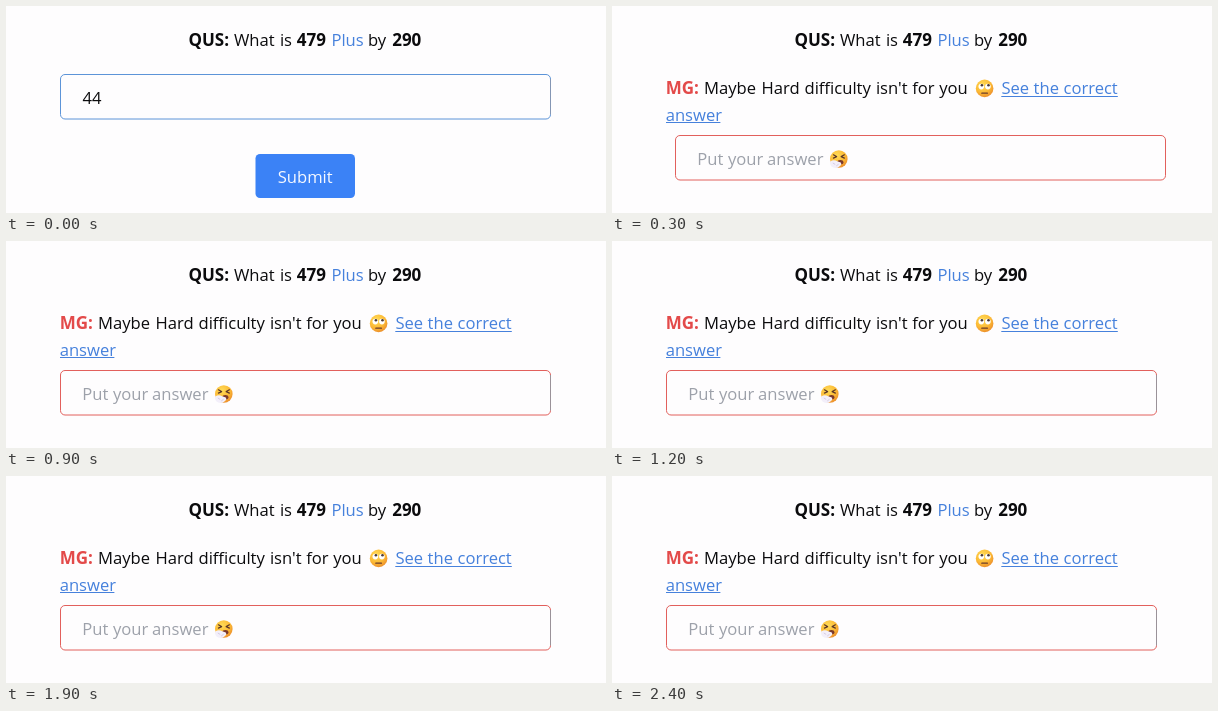
These frames come from a looping animation (600x207 px, 2500 ms). An HTML page:

```html
<!DOCTYPE html>
<html lang="en">
<head>
<meta charset="utf-8">
<title>Quiz question</title>
<style>
  html, body { margin: 0; width: 100%; height: 100%; overflow: hidden; background: #fefdfe; }
  svg { display: block; width: 600px; height: 207px; }
  text { font: 16.6px "Open Sans", "Noto Sans", sans-serif; fill: #0b0b0d; }
  .bold { font-size: 17px; font-weight: 700; }
  .red { fill: #e34a4a; }
  .blue { fill: #4681dc; }
  .hint { fill: #9da1aa; }
  .white { fill: #f5f8ff; }
  .rule { stroke: #4681dc; stroke-width: 1; }
  .box { fill: #fefdfe; }
</style>
</head>
<body>
<svg viewBox="0 0 600 207">
  <defs>
    <radialGradient id="skin" cx=".4" cy=".3" r=".75">
      <stop offset="0" stop-color="#ffdc58"/>
      <stop offset=".6" stop-color="#fcb934"/>
      <stop offset="1" stop-color="#ea8a2c"/>
    </radialGradient>
  </defs>

  <g id="title"></g>

  <g id="ask">
    <rect class="box" x="54.5" y="68.5" width="490" height="44.5" rx="4.5" stroke="#5c94d8"/>
    <path d="M544.5 73V108.5" stroke="#8496b4"/>
    <rect x="249.5" y="148" width="99.5" height="44" rx="4.5" fill="#3b82f6"/>
  </g>

  <g id="wrong">
    <path class="rule" d="M389.3 90.5H505.8M54 116.5H108.4"/>
    <g transform="translate(372.6 82.4)">
      <circle r="8.8" fill="url(#skin)"/>
      <g fill="#fff">
        <circle cx="-3.3" cy="-1.8" r="2.8"/>
        <circle cx="3.3" cy="-1.8" r="2.8"/>
      </g>
      <g fill="#4b3a38">
        <circle cx="-2.7" cy="-3.2" r="1.3"/>
        <circle cx="3.9" cy="-3.2" r="1.3"/>
      </g>
      <path d="M-2.8 4.8H2.8" stroke="#6b3d2a" stroke-width="1.3" stroke-linecap="round"/>
    </g>
    <g id="field">
      <rect class="box" x="54.5" y="129.5" width="490" height="44.5" rx="4.5" stroke="#e2605c"/>
      <path id="edge" d="M544.5 134V169.5" stroke="#9a9299"/>
      <g transform="translate(217.8 153)">
        <circle r="8.8" fill="url(#skin)"/>
        <g fill="none" stroke="#5a3527" stroke-width="1.2" stroke-linecap="round" stroke-linejoin="round">
          <path d="M-5.4 -4.2L-2.2 -2.4L-5.4 -.9"/>
          <path d="M5.6 -4.2L2.4 -2.4L5.6 -.9"/>
        </g>
        <ellipse cx="1.6" cy="3.2" rx="3" ry="2.2" fill="#7c3a2b"/>
        <path d="M-8.6 2.4Q-5 .2 -1.6 2.2L2 3.6Q3.4 6 .6 7.4Q-2 9.6 -5.6 8.6Q-9.6 6.4 -8.6 2.4Z" fill="#f3effa"/>
        <path d="M-6 4L-3.6 5.4M-2.6 7L-.2 5.2" stroke="#cfc3dd" stroke-width=".8"/>
      </g>
    </g>
  </g>
</svg>
<script>
  const LOOP = 2500, STEP = 100;
  // Horizontal offset of the answer field for each step after the submit.
  const SHAKE = [1.5, -3, 9, -2, 0];
  const $ = id => document.getElementById(id);

  // Places [word, x] pairs on one baseline.
  function write(group, y, style, ...words) {
    for (const [word, x] of words) {
      const el = document.createElementNS("http://www.w3.org/2000/svg", "text");
      el.setAttribute("x", x);
      el.setAttribute("y", y);
      el.setAttribute("class", style);
      el.textContent = word;
      $(group).append(el);
    }
  }

  write("title", 40, "bold", ["QUS:", 182.4], ["479", 290.8], ["290", 386.2]);
  write("title", 40, "", ["What", 228], ["is", 273.9], ["by", 362]);
  write("title", 40, "blue", ["Plus", 325.4]);

  write("ask", 97.5, "", ["44", 76.4]);
  write("ask", 177, "white", ["Submit", 271.7]);

  write("wrong", 88, "bold red", ["MG:", 53.7]);
  write("wrong", 88, "", ["Maybe", 92], ["Hard", 149.5], ["difficulty", 192.5],
    ["isn't", 263.9], ["for", 300.2], ["you", 327.2]);
  write("wrong", 88, "blue", ["See", 389.4], ["the", 421.6], ["correct", 451.5]);
  write("wrong", 114.5, "blue", ["answer", 53.7]);
  write("field", 159, "hint", ["Put", 76.3], ["your", 106.9], ["answer", 146.1]);

  function draw() {
    const step = Math.floor(performance.now() % LOOP / STEP);
    const sent = step > 0;
    const shift = sent ? SHAKE[Math.min(step, SHAKE.length) - 1] : 0;
    $("ask").style.display = sent ? "none" : "";
    $("wrong").style.display = sent ? "" : "none";
    $("field").setAttribute("transform", `translate(${shift} 0)`);
    $("edge").style.display = shift ? "none" : "";
    requestAnimationFrame(draw);
  }
  draw();
</script>
</body>
</html>
```
